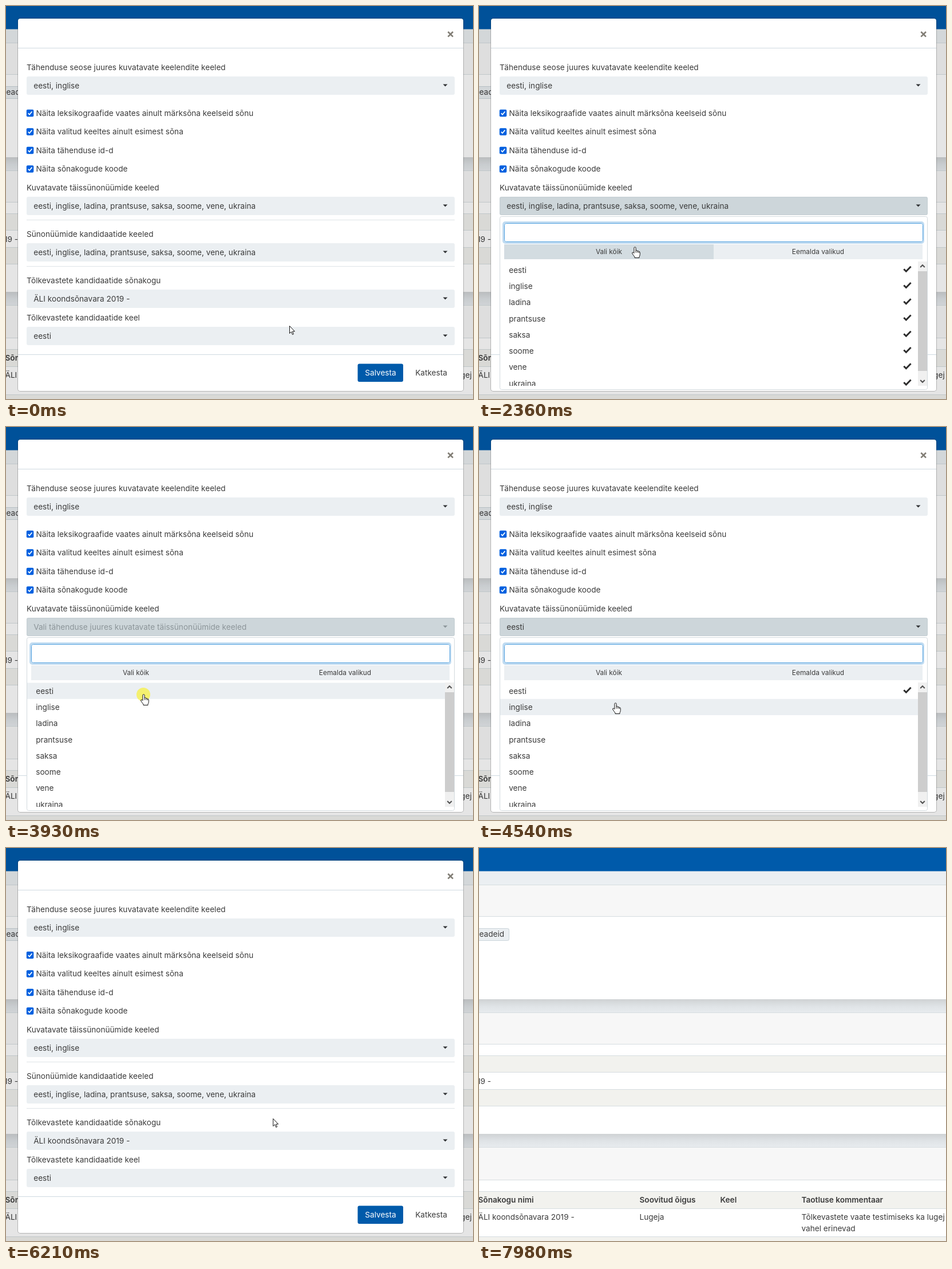
These frames come from a looping animation (816 by 686 pixels, 8190 ms). An HTML page with a canvas:

```html
<!DOCTYPE html>
<html lang="et">
<head>
<meta charset="utf-8">
<title>Seaded</title>
<style>
html, body { margin: 0; width: 100%; height: 100%; overflow: hidden; background: #ebeff2; }
canvas { display: block; }
</style>
</head>
<body>
<canvas id="stage" width="816" height="686"></canvas>
<script>
const ctx = document.getElementById('stage').getContext('2d');
const LOOP = 8190;
const INK = '#3b3b3b', FIELD = '#ebeff2', HOVER = '#d3dce1', OPEN = '#cdd6da', BLUE = '#005aaa';
const DICT = 'ÄLI koondsõnavara 2019 -';
const LANGS = ['eesti', 'inglise', 'ladina', 'prantsuse', 'saksa', 'soome', 'vene', 'ukraina'];
const ROW = 28.25, LIST_TOP = 446.5;

// start, end, steps, x, y
const MOVES = [
  [200, 360, 3, 330, 376],
  [670, 810, 3, 304, 356],
  [2150, 2360, 4, 272, 421],
  [2460, 2460, 1, 270, 422],
  [2650, 2930, 5, 560, 429],
  [3450, 3860, 7, 240, 467],
  [4120, 4260, 3, 238, 482],
  [4660, 5120, 8, 467, 283],
  [5720, 5890, 3, 458, 465],
  [6210, 6700, 8, 651, 628],
  [6770, 6840, 2, 647, 638],
  [7450, 7580, 3, 693, 667]
];
const CLICKS = [[1550, 1700], [3000, 3140], [3930, 3990], [4450, 4520], [5190, 5280], [7040, 7180]];

const within = (t, a, b) => t >= a && t < b;
const inBox = (p, x, y, w, h) => p.x >= x && p.x < x + w && p.y >= y && p.y < y + h;

function pointer(t) {
  let x = 495, y = 558;
  for (const [a, b, n, tx, ty] of MOVES) {
    if (t < a) break;
    const gap = n > 1 ? (b - a) / (n - 1) : 1;
    const k = Math.min(n, Math.floor((t - a) / gap + 1e-6) + 1) / n;
    const e = k * k * (3 - 2 * k);
    x += (tx - x) * e;
    y += (ty - y) * e;
  }
  return { x, y };
}

function rect(x, y, w, h, color) {
  ctx.fillStyle = color;
  ctx.fillRect(x, y, w, h);
}

function box(x, y, w, h, r, fill, line) {
  ctx.beginPath();
  ctx.roundRect(x, y, w, h, r);
  ctx.fillStyle = fill;
  ctx.fill();
  if (line) {
    ctx.beginPath();
    ctx.roundRect(x + .5, y + .5, w - 1, h - 1, r);
    ctx.strokeStyle = line;
    ctx.lineWidth = 1;
    ctx.stroke();
  }
}

function text(str, x, mid, { size = 13.64, color = INK, weight = 400, align = 'left', font = 'Inter' } = {}) {
  ctx.font = `${weight} ${size}px "${font}", sans-serif`;
  ctx.fillStyle = color;
  ctx.textAlign = align;
  ctx.fillText(str, x, Math.round(mid + size * .364));
}

function line(points, color, width) {
  ctx.beginPath();
  points.forEach(([x, y]) => ctx.lineTo(x, y));
  ctx.strokeStyle = color;
  ctx.lineWidth = width;
  ctx.stroke();
}

function drawPage() {
  rect(0, 0, 816, 686, FIELD);
  rect(0, 0, 816, 40.5, BLUE);
  for (const [top, head, end] of [[65, 119, 264], [288, 343, 499], [523, 579, 686]]) {
    rect(0, top, 816, head - top, '#f7f7f7');
    rect(0, head, 816, end - head, '#fff');
    if (end < 686) {
      const g = ctx.createLinearGradient(0, end, 0, end + 24);
      g.addColorStop(0, '#cfd2d4');
      g.addColorStop(.5, '#dfe3e6');
      g.addColorStop(1, '#e8ecef');
      rect(0, end, 816, 24, g);
    }
  }
  for (const y of [363, 421, 600]) rect(0, y, 816, 29, '#f2f2ee');
  rect(0, 679, 816, 7, '#f2f2ee');
  for (const y of [64, 119, 287, 342, 362, 391, 421, 450, 522, 579, 599, 629, 678])
    rect(0, y, 816, 1, '#d6dde0');

  box(-20, 140, 73, 22, 3, FIELD, '#cbd5da');
  text('eadeid', .5, 150.5);
  text(DICT, 21, 407, { align: 'right' });
  const bold = { weight: 600 };
  text('Sõnakogu nimi', -1.5, 614.5, bold);
  text('Soovitud õigus', 280.5, 614.5, bold);
  text('Keel', 421.5, 614.5, bold);
  text('Taotluse kommentaar', 563.5, 614.5, bold);
  text(DICT, -1.5, 644);
  text('Lugeja', 280.5, 644);
  text('Tõlkevastete vaate testimiseks ka lugej', 563.5, 644);
  text('vahel erinevad', 563.5, 664);
}

function drawSelect(y, value, p, { open, empty, ring } = {}) {
  const hot = inBox(p, 36, y, 748, 32);
  if (ring) box(33, y - 3, 754, 38, 5, '#dfe6ea');
  const edge = open ? '#c3cdd2' : hot ? '#c6d1d8' : null;
  box(36, y, 748, 32, 3, open ? OPEN : hot ? HOVER : FIELD, edge);
  const color = empty ? '#8c9599' : INK;
  text(value, 48.2, y + 16, { color });
  ctx.beginPath();
  ctx.moveTo(763.5, y + 13.5);
  ctx.lineTo(771.5, y + 13.5);
  ctx.lineTo(767.5, y + 17.5);
  ctx.fillStyle = empty ? color : '#303234';
  ctx.fill();
  return hot;
}

function drawCheckbox(mid, label) {
  box(35.8, mid - 6.2, 12.5, 12.5, 2, '#0060df');
  line([[38.7, mid + .2], [41, mid + 2.6], [45.4, mid - 2.8]], '#fff', 1.7);
  text(label, 52.5, mid);
}

function drawMenu(p, chosen, focused) {
  let hot = false;
  box(36, 367, 748, 303, 3, '#fff', '#d3dade');
  if (focused) box(41, 376, 737, 39, 5, '#c0dbf1');
  box(44, 379, 732, 33, 3, '#fff', focused ? '#55a3e0' : '#8f9193');

  [['Vali kõik', 44, 366], ['Eemalda valikud', 410, 365]].forEach(([label, x, w]) => {
    const over = inBox(p, x, 416, w, 26);
    hot = hot || over;
    rect(x, 416, w, 26, over ? HOVER : FIELD);
    text(label, x + w / 2, 428.7, { size: 11.9, align: 'center' });
  });

  ctx.save();
  ctx.beginPath();
  ctx.rect(37, 446, 746, 217);
  ctx.clip();
  LANGS.forEach((name, i) => {
    const y = LIST_TOP + i * ROW;
    if (inBox(p, 37, y, 730, ROW)) {
      hot = true;
      rect(37, y, 730, ROW, FIELD);
    }
    text(name, 52.2, y + 14.3);
    if (i < chosen) line([[742.3, y + 12.7], [746.3, y + 16.7], [754.6, y + 8.2]], '#2c2c2c', 3);
  });
  rect(767, 446, 16, 217, '#f0f0f0');
  rect(767, 463, 16, 174, '#cdcdcd');
  line([[771.2, 456], [775, 452.2], [778.8, 456]], '#505050', 2);
  line([[771.2, 653], [775, 656.8], [778.8, 653]], '#505050', 2);
  ctx.restore();
  return hot;
}

function drawModal(t, p) {
  const open = within(t, 1770, 5330);
  const chosen = t < 3140 ? 8 : t < 4060 ? 0 : t < 4590 ? 1 : 2;
  let hot = false;
  const select = (...args) => { hot = drawSelect(...args) || hot; };

  box(20, 21, 780, 652, 5, 'rgba(0,0,0,.22)');
  box(21, 22, 778, 650, 4, '#fff');
  line([[772.3, 45], [781, 53.7]], '#817d75', 2.6);
  line([[781, 45], [772.3, 53.7]], '#817d75', 2.6);
  for (const y of [73, 608]) rect(21, y, 778, 1, '#cfdae1');
  for (const y of [373, 454]) rect(36, y, 748, 1, '#dfe4e7');

  text('Tähenduse seose juures kuvatavate keelendite keeled', 36, 107);
  select(123, 'eesti, inglise', p);
  drawCheckbox(187, 'Näita leksikograafide vaates ainult märksõna keelseid sõnu');
  drawCheckbox(219.4, 'Näita valitud keeltes ainult esimest sõna');
  drawCheckbox(252, 'Näita tähenduse id-d');
  drawCheckbox(284.4, 'Näita sõnakogude koode');
  text('Kuvatavate täissünonüümide keeled', 36, 317);
  const value = chosen ? LANGS.slice(0, chosen).join(', ')
    : 'Vali tähenduse juures kuvatavate täissünonüümide keeled';
  select(333, value, p, { open, empty: !chosen, ring: within(t, 1700, 1770) });

  if (open) {
    const focused = t < 5280 && !within(t, 3070, 3210);
    return drawMenu(p, chosen, focused) || hot;
  }

  text('Sünonüümide kandidaatide keeled', 36, 398);
  select(414, LANGS.join(', '), p);
  text('Tõlkevastete kandidaatide sõnakogu', 36, 479);
  select(495, DICT, p);
  text('Tõlkevastete kandidaatide keel', 36, 544);
  select(560, 'eesti', p);

  const overSave = inBox(p, 614, 624, 80, 32);
  const pressed = t >= 7110;
  if (pressed) box(611, 621, 86, 38, 5, '#80acd4');
  box(614.5, 624.5, 79.5, 31.5, 3, overSave || pressed ? '#004583' : BLUE);
  text('Salvesta', 654.5, 640.3, { color: '#fff', align: 'center' });
  text('Katkesta', 743, 640.3, { align: 'center' });
  return hot || overSave;
}

const ARROW = new Path2D('M0 0V13L3 10.2L5 15L7 14.2L5 9.5H9Z');
const HAND = new Path2D('M-1.6 10V.8Q-1.6-.7 0-.7Q1.6-.7 1.6.8V5Q4 4.6 4.3 6Q6.3 5.6 6.7 7' +
  'Q8.8 7 8.8 9V12Q8.8 14.5 7.5 16V18H-.5V16.5Q-2 14.5-4.8 10.5Q-5.2 8-3 8.6Z');
const KNUCKLES = new Path2D('M1.6 5V9M4.3 6V9M6.7 7V9.5');

function drawPointer(p, hot) {
  ctx.save();
  ctx.translate(p.x + .5, p.y + .5);
  const shape = hot ? HAND : ARROW;
  ctx.fillStyle = '#fff';
  ctx.strokeStyle = '#111';
  ctx.lineWidth = 1;
  ctx.fill(shape);
  ctx.stroke(shape);
  if (hot) ctx.stroke(KNUCKLES);
  ctx.restore();
}

function draw(t) {
  drawPage();
  if (t >= 7980) return;
  rect(0, 0, 816, 686, 'rgba(0,0,0,.1)');
  const p = pointer(t);
  const hot = drawModal(t, p);
  if (within(t, 1420, 1550)) {
    box(304.5, 376.5, 308, 20, 3, '#2b2a33');
    text(LANGS.join(', '), 308, 387, { size: 10.85, color: '#fbfbfe', font: 'Open Sans' });
  }
  if (CLICKS.some(([a, b]) => within(t, a, b))) {
    ctx.beginPath();
    ctx.arc(p.x, p.y, 12, 0, Math.PI * 2);
    ctx.fillStyle = 'rgba(246,240,60,.72)';
    ctx.fill();
  }
  drawPointer(p, hot);
}

let start;
function tick(now) {
  if (start === undefined) start = now;
  draw((now - start) % LOOP);
  requestAnimationFrame(tick);
}
draw(0);
requestAnimationFrame(tick);
</script>
</body>
</html>
```
